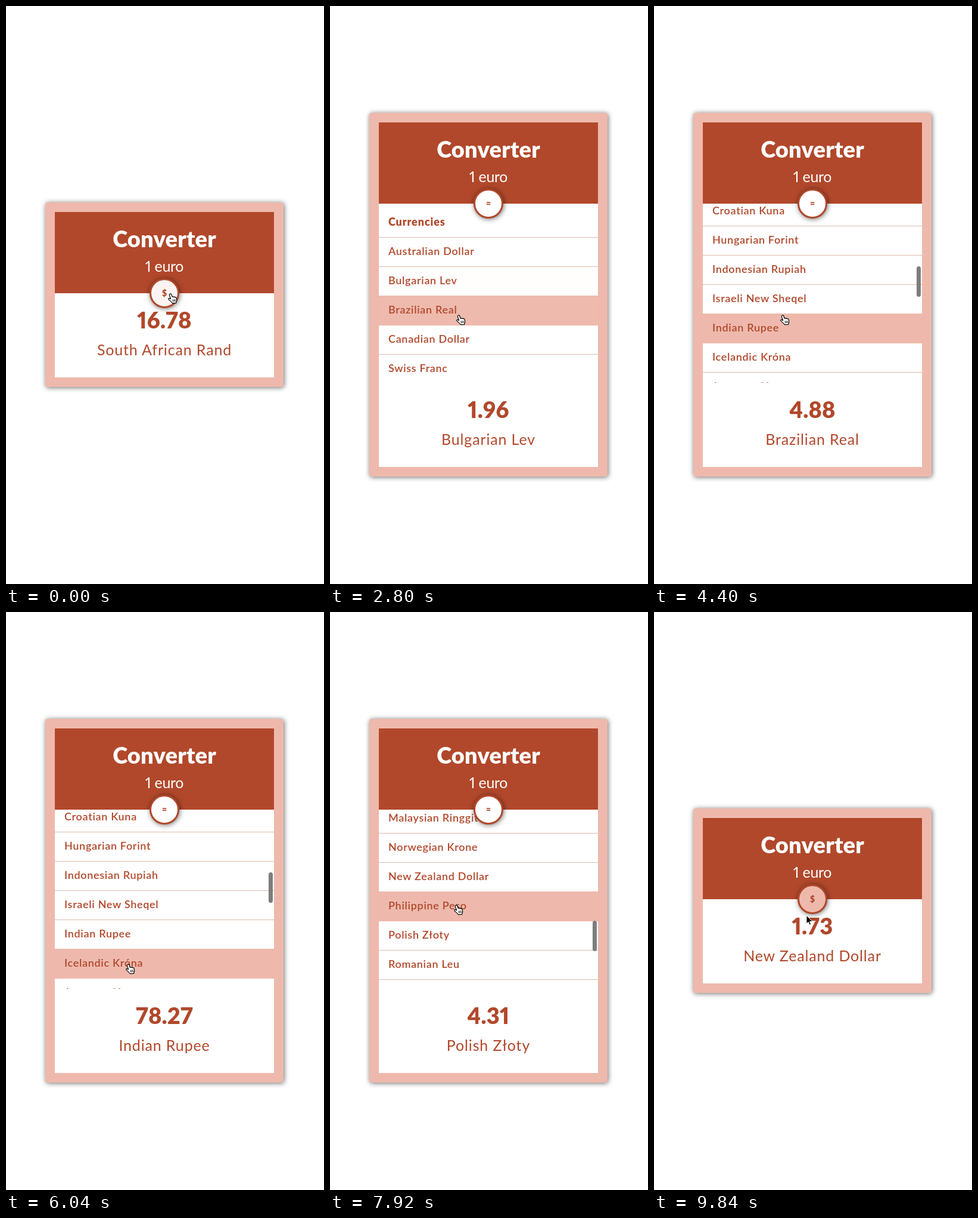
Write an HTML page that moves like this. It is 534x968 px and loops after 9880 ms.

```html
<!DOCTYPE html>
<html lang="en">
<head>
<meta charset="utf-8">
<title>Converter</title>
<style>
  html, body { margin: 0; width: 100%; height: 100%; overflow: hidden; background: #fff; }
  svg { display: block; }
  #stage { width: 100vw; height: 100vh; }
  text { font-family: Lato, "Open Sans", sans-serif; fill: #b1482b; }
  .mid { text-anchor: middle; }
  .big { font-size: 38px; font-weight: 900; letter-spacing: .2px; font-variant-numeric: proportional-nums; }
  .label { font-size: 25px; font-weight: 400; letter-spacing: .85px; }
  .unit { letter-spacing: -.3px; font-variant-numeric: proportional-nums; }
  .row { font-size: 18px; font-weight: 600; letter-spacing: .68px; }
  .head { font-size: 18px; font-weight: 900; letter-spacing: .9px; }
  .sign { font-size: 14px; font-weight: 900; }
  .light text { fill: #fff; }
  #card { fill: #eeb9ac; filter: drop-shadow(1.3px 1.3px 4px rgba(0, 0, 0, .58)); }
  #disc { stroke: #b1482b; stroke-width: 3; filter: drop-shadow(1px 1px 4px rgba(0, 0, 0, .55)); }
</style>
</head>
<body>
<svg id="stage" viewBox="0 0 534 968">
  <rect id="card" x="66" width="400" rx="4"/>
  <g id="top" class="light">
    <rect x="82" y="345" width="368" height="136" fill="#b1482b"/>
    <text class="mid big" x="266" y="404">Converter</text>
    <text class="mid label unit" x="266" y="445">1 euro</text>
  </g>
  <svg id="list" x="82" width="368" overflow="hidden">
    <rect width="368" height="300" fill="#fff"/>
    <g id="rows"><text class="head" x="16" y="37">Currencies</text></g>
    <rect id="thumb" x="359" width="7" height="51" rx="3.5" fill="#7d7d7d"/>
  </svg>
  <g id="bottom">
    <rect x="82" y="481" width="368" height="141" fill="#fff"/>
    <text id="value" class="mid big" x="266" y="540"></text>
    <text id="name" class="mid label" x="266" y="585"></text>
  </g>
  <g id="button">
    <circle id="disc" cx="266" cy="481" r="23.5"/>
    <text id="sign" class="mid sign" x="266" y="486"></text>
  </g>
  <g id="cursor">
    <g id="hand" stroke="#000" stroke-linejoin="round" stroke-linecap="round">
      <path fill="#fff" stroke-width="1.2" d="M3.2 1.2C4.4.6 5.4 1.2 5.8 2.3L7.2 6.2C8 5.6 9 5.8 9.4 6.5C10.2 5.9 11.4 6 11.8 6.9C12.7 6.4 13.8 6.7 14 7.8L14.6 10.6C14.9 12.4 14.4 13.6 13.8 14.8L13.6 16.4L7.2 16.6C6.6 15 4.6 13.6 1.2 10.6C.2 9.6 1 8.2 2.4 8.5L4.6 9.6L2.4 3.2C2.1 2.3 2.4 1.6 3.2 1.2Z"/>
      <path fill="none" stroke-width=".9" d="M7.9 11l.8 3M9.9 10.7l.7 3M11.9 10.4l.6 3"/>
    </g>
    <path id="arrow" transform="translate(4 1)" fill="#000" stroke="#fff" d="M0 0V14.2L3.2 11.3L5.3 16.2L7.6 15.2L5.5 10.4H10Z"/>
  </g>
</svg>
<script>
const LOOP = 9880, TICK = 40, FADE = 300;
const ROW = 49, HEAD = 56, LIST = 300;

const names = ['Australian Dollar', 'Bulgarian Lev', 'Brazilian Real', 'Canadian Dollar',
  'Swiss Franc', 'Chinese Yuan', 'Czech Koruna', 'Danish Krone', 'Pound Sterling',
  'Hong Kong Dollar', 'Croatian Kuna', 'Hungarian Forint', 'Indonesian Rupiah',
  'Israeli New Sheqel', 'Indian Rupee', 'Icelandic Króna', 'Japanese Yen',
  'South Korean Won', 'Mexican Peso', 'Malaysian Ringgit', 'Norwegian Krone',
  'New Zealand Dollar', 'Philippine Peso', 'Polish Złoty', 'Romanian Leu',
  'Russian Rouble', 'Swedish Krona', 'Singapore Dollar', 'Thai Baht', 'Turkish Lira',
  'US Dollar', 'South African Rand'];

// time, rate, currency
const picks = [
  [0, '16.78', 'South African Rand'], [2050, '1.96', 'Bulgarian Lev'],
  [3040, '4.88', 'Brazilian Real'], [4980, '78.27', 'Indian Rupee'],
  [6180, '138.90', 'Icelandic Króna'], [7400, '4.31', 'Polish Złoty'],
  [8340, '1.73', 'New Zealand Dollar']];

// row, pointer enters, pointer leaves
const hovers = [
  ['Bulgarian Lev', 640, 1280], ['Australian Dollar', 1280, 1820],
  ['Bulgarian Lev', 1820, 2560], ['Brazilian Real', 2560, 3500],
  ['Indian Rupee', 3960, 5610], ['Icelandic Króna', 5610, 6640],
  ['Romanian Leu', 7040, 7190], ['Polish Złoty', 7190, 7600],
  ['Philippine Peso', 7600, 8050], ['New Zealand Dollar', 8050, 8590],
  ['Norwegian Krone', 8590, 8710], ['Malaysian Ringgit', 8710, 8770]];
const buttonHovers = [[-40, 620], [8770, 9010], [9520, 9840]];

// time, x, y
const path = [
  [0, 272, 481], [440, 273, 485], [1080, 273, 485], [1400, 238, 416], [1700, 238, 416],
  [1950, 232, 452], [2400, 226, 466], [2760, 212, 517], [4500, 212, 517],
  [4750, 210, 532], [5400, 210, 532], [5800, 201, 589], [7100, 201, 589],
  [7300, 206, 546], [7460, 206, 546], [7740, 208, 490], [7940, 208, 490],
  [8160, 212, 446], [8460, 212, 446], [8860, 262, 333], [9320, 262, 333],
  [9620, 264, 478], [9680, 264, 480], [9840, 252, 507]];

const $ = id => document.getElementById(id);
const clamp = x => Math.min(1, Math.max(0, x));
const smooth = x => x * x * (3 - 2 * x);
const ramp = (t, from, to) => clamp((t - from) / (to - from));

// cubic-bezier(.25, .1, .25, 1)
function ease(x) {
  if (x <= 0 || x >= 1) return clamp(x);
  let lo = 0, hi = 1, u;
  for (let i = 0; i < 20; i++) {
    u = (lo + hi) / 2;
    const bx = .75 * u * (1 - u) + u ** 3;
    if (bx < x) lo = u; else hi = u;
  }
  return .3 * u * (1 - u) ** 2 + 3 * u * u * (1 - u) + u ** 3;
}

function glow(t, start, end) {
  const up = ease((Math.min(t, end) - start) / FADE);
  return t < end ? up : up * (1 - ease((t - end) / FADE));
}

function pointer(t) {
  let i = path.length - 1;
  while (i > 0 && path[i][0] > t) i--;
  const a = path[i], b = path[i + 1] || a;
  const k = a === b ? 0 : smooth(ramp(t, a[0], b[0]));
  return [a[1] + (b[1] - a[1]) * k, a[2] + (b[2] - a[2]) * k];
}

function add(parent, tag, attrs) {
  const el = document.createElementNS('http://www.w3.org/2000/svg', tag);
  for (const key in attrs) el.setAttribute(key, attrs[key]);
  return parent.appendChild(el);
}

const shades = {};
names.forEach((_, i) =>
  add($('rows'), 'rect', { y: HEAD + i * ROW, width: 368, height: 1, fill: '#dcbcae' }));
names.forEach((name, i) => {
  const y = HEAD + i * ROW;
  shades[name] = add($('rows'), 'rect', { y, width: 368, height: ROW + 1, fill: '#eeb9ac', opacity: 0 });
  add($('rows'), 'text', { class: 'row', x: 16, y: y + 30 }).textContent = name;
});

const move = (id, x, y) => $(id).setAttribute('transform', `translate(${x} ${y})`);
const set = (id, key, value) => $(id).setAttribute(key, value);
const write = (id, text) => { if ($(id).textContent !== text) $(id).textContent = text; };

function draw(t) {
  const open = ease(ramp(t, 600, 900)) - ease(ramp(t, 8960, 9260));
  const h = LIST * open, half = h / 2;
  set('card', 'y', 329 - half);
  set('card', 'height', 309 + h);
  move('top', 0, -half);
  move('button', 0, -half);
  move('bottom', 0, half);
  set('list', 'y', 481 - half);
  set('list', 'height', Math.max(0, h));

  const scroll = Math.round(558 * smooth(ramp(t, 3280, 3980)) + 439 * smooth(ramp(t, 6440, 7060)));
  move('rows', 0, -scroll);
  set('thumb', 'y', 2 + scroll * .1845);
  set('thumb', 'opacity', ramp(t, 3240, 3320) - ramp(t, 8500, 8700));

  const level = {};
  for (const [name, start, end] of hovers)
    level[name] = Math.max(level[name] || 0, glow(t, start, end));
  for (const name in level) shades[name].setAttribute('opacity', level[name]);

  const tint = Math.max(...buttonHovers.map(([start, end]) => glow(t, start, end)));
  const mix = c => Math.round(255 + (c - 255) * tint);
  set('disc', 'fill', `rgb(${mix(238)},${mix(185)},${mix(172)})`);
  write('sign', t >= 600 && t < 8960 ? '=' : '$');

  const pick = picks.filter(p => p[0] <= t).pop();
  write('value', pick[1]);
  write('name', pick[2]);

  const isArrow = t >= 9010 && t < 9520 || t >= 9820;
  move('cursor', ...pointer(t));
  set('hand', 'visibility', isArrow ? 'hidden' : 'visible');
  set('arrow', 'visibility', isArrow ? 'visible' : 'hidden');
}

const begin = performance.now();
function frame() {
  const t = (performance.now() - begin) % LOOP;
  draw(Math.floor(t / TICK) * TICK);
  requestAnimationFrame(frame);
}
frame();
</script>
</body>
</html>
```
